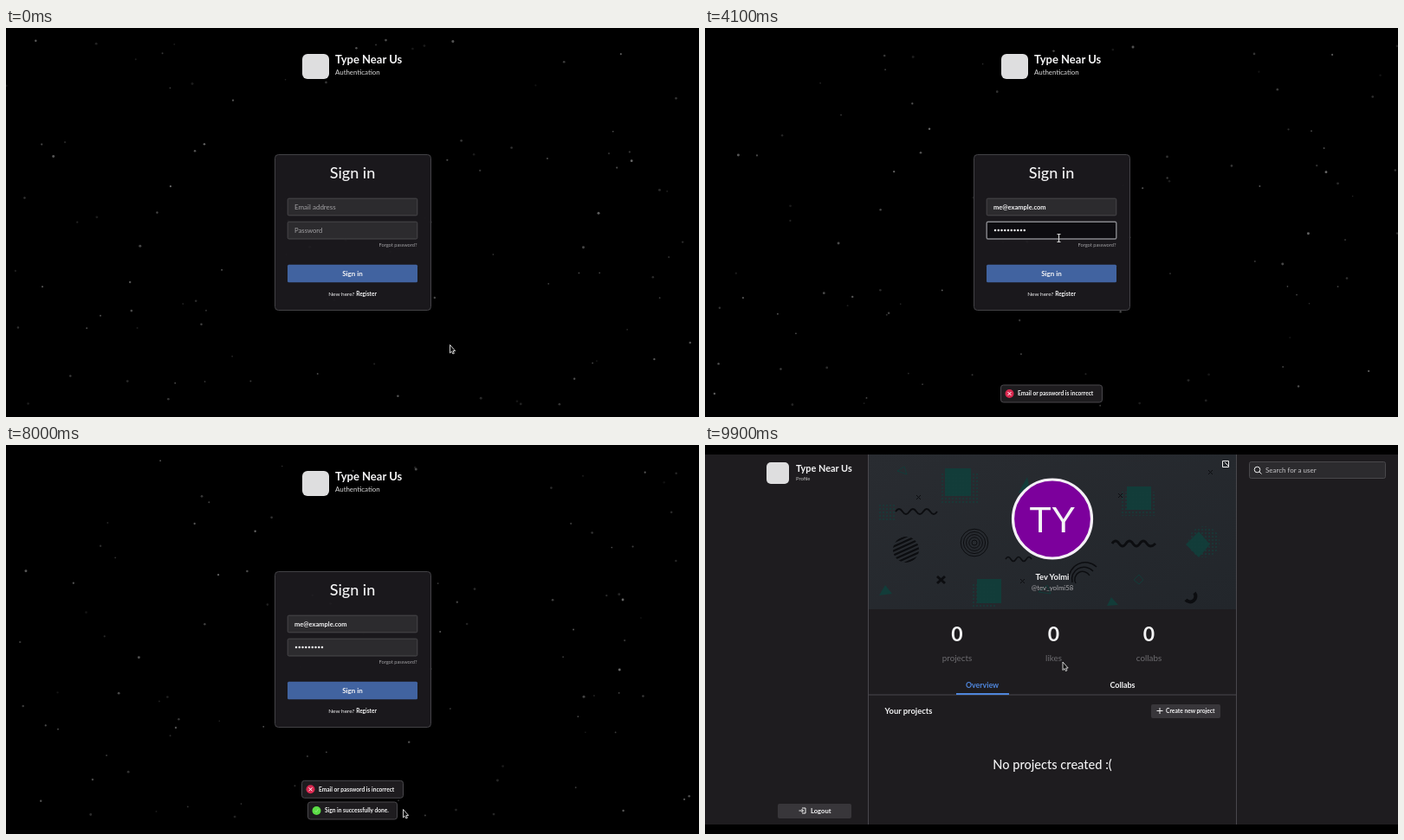
An HTML page for the animation above (10000 ms loop, 800x450 px).

```html
<!DOCTYPE html>
<html lang="en">
<head>
<meta charset="utf-8">
<title>Sign in</title>
<style>
  html, body { margin: 0; width: 100%; height: 100%; overflow: hidden; background: #000; }
  svg { display: block; width: 100vw; height: 100vh; }
  text { font-family: Lato, "Open Sans", sans-serif; fill: #f4f4f5; }
  .b { font-weight: 700; }
  .m { text-anchor: middle; }
  .dim { fill: #a2a1a4; }
  .field { fill: #2c2b2e; stroke: #49484b; }
  .focus { fill: #0d0c10; stroke: #87878c; stroke-width: 1.4; }
  .line { fill: none; stroke: #f0f0f0; }
  .rule { fill: none; stroke: #49474c; }
  .ink { fill: none; stroke: #0c0d10; }
  .teal { fill: none; stroke: #123c39; }
  .count { font: 700 23px Lato, sans-serif; }
  .label { font-size: 9.8px; fill: #6d6c70; }
</style>
</head>
<body>
<svg viewBox="0 0 800 450">
  <defs>
    <clipPath id="screen"><rect y="11" width="800" height="428"/></clipPath>
    <clipPath id="disc"><circle cx="232" cy="121" r="15"/></clipPath>
    <pattern id="dots" width="4" height="4" patternUnits="userSpaceOnUse">
      <circle cx="2" cy="2" r=".9" fill="#123c39"/>
    </pattern>
    <linearGradient id="shade" x2="1" y2="1">
      <stop stop-color="#292c31"/><stop offset="1" stop-color="#22262b"/>
    </linearGradient>
  </defs>

  <g id="login">
    <g id="stars"></g>
    <rect x="342" y="30" width="31" height="29" rx="6" fill="#dededf"/>
    <text class="b" x="380" y="41" font-size="13">Type Near Us</text>
    <text x="380" y="54" font-size="7.9" style="fill:#ddd">Authentication</text>

    <rect x="310.5" y="146.5" width="180" height="180" rx="4" fill="#1c1a1e" fill-opacity=".94" stroke="#434246"/>
    <text class="m" x="400" y="173.5" font-size="18" font-weight="500">Sign in</text>
    <rect id="emailBox" x="325.2" y="197.2" width="149.6" height="19.6" rx="1.5"/>
    <rect id="passBox" x="325.2" y="224.2" width="149.6" height="19.8" rx="1.5"/>
    <text id="emailHint" class="dim" x="333" y="209.5" font-size="8">Email address</text>
    <text id="passHint" class="dim" x="333" y="236.5" font-size="7.7">Password</text>
    <text id="email" class="b" x="333" y="209.5" font-size="7.5"></text>
    <line id="pass" x1="335" y1="234" y2="234" stroke="#f4f4f5" stroke-width="2.5" stroke-linecap="round" stroke-dasharray="0 3.75"/>
    <rect id="caret" width=".9" height="8" fill="#ddd"/>
    <text class="dim" x="474.5" y="253" font-size="5.7" text-anchor="end">Forgot password?</text>
    <rect id="button" x="325" y="273.7" width="150" height="20.5" rx="1.5"/>
    <text class="m b" x="400" y="286.7" font-size="8">Sign in</text>
    <text class="m" x="400" y="310" font-size="6.5">New here? <tspan class="b">Register</tspan></text>
  </g>

  <g id="profile">
    <rect y="11" width="800" height="428" fill="#1e1c1f"/>
    <rect x="71" y="20" width="26" height="25" rx="5" fill="#dededf"/>
    <text class="b" x="105" y="30.5" font-size="10.9">Type Near Us</text>
    <text x="105" y="40.5" font-size="5.8" style="fill:#bbb">Profile</text>

    <rect x="189" y="11" width="424" height="179" fill="url(#shade)"/>
    <g id="banner">
      <g fill="#123c39">
        <rect x="277" y="27" width="30" height="32"/>
        <rect x="314" y="155" width="28" height="28"/>
        <rect x="487" y="48" width="28" height="27"/>
        <path d="M555 115l15-15 13 15-13 15zM362 55l10-18 4 20zM201 174l7-12 8 10zM464 186l5-10 8 9z"/>
      </g>
      <g fill="url(#dots)">
        <rect x="272" y="32" width="44" height="36"/>
        <rect x="308" y="160" width="28" height="28"/>
        <rect x="480" y="54" width="40" height="28"/>
        <circle cx="576" cy="112" r="18"/>
        <rect x="200" y="68" width="20" height="20"/>
      </g>
      <g class="ink">
        <path d="M220 77q4-6 8 0t8 0 8 0 8 0 8 0 8 0" stroke-width="2"/>
        <path d="M470 114q4-6 8 0t8 0 8 0 8 0 8 0 10 0" stroke-width="3"/>
        <path d="M347 132q3-5 6 0t6 0 6 0 6 0 6 0" stroke-width="1.5"/>
        <path d="M268 152l9 8m0-8l-9 8" stroke-width="3"/>
        <path d="M244 58l5 5m0-5l-5 5M364 155l5 5m0-5l-5 5M581 29l5 5m0-5l-5 5M477 56l5 5m0-5l-5 5"/>
        <path d="M565 171a6 6 0 0 1-10 8" stroke-width="4"/>
        <path d="M424 159a14 14 0 0 1 24-13M428 160a9 9 0 0 1 16-9M420 156a19 19 0 0 1 32-15" stroke-width="1.5"/>
        <g id="stripes" clip-path="url(#disc)" stroke-width="2.2"></g>
        <g id="rings"></g>
      </g>
      <path class="teal" d="M385 170l10-8 4 10zM495 156l6-6 5 6-5 5zM222 30l8-5 3 9z"/>
    </g>
    <circle cx="401" cy="85.5" r="45.5" fill="#7c009c" stroke="#f4f0f6" stroke-width="3.2"/>
    <text class="m" x="401" y="101" style="font:42px 'Liberation Sans',Arial,sans-serif">TY</text>
    <text class="m b" x="401" y="156" font-size="9.4">Tev Yolmi</text>
    <text class="m" x="401" y="167.5" font-size="7.8" style="fill:#aaa9ac">@tev_yolmi58</text>
    <path class="line" d="M601 18.5h-3.5v7h7v-3.5M600 20l4 4M601 18.5h3.5v3.5"/>

    <text class="m count" x="291" y="227">0</text>
    <text class="m count" x="402.5" y="227">0</text>
    <text class="m count" x="512.5" y="227">0</text>
    <text class="m label" x="291" y="249.5">projects</text>
    <text class="m label" x="402.5" y="249.5">likes</text>
    <text class="m label" x="512.5" y="249.5">collabs</text>

    <path class="rule" d="M188.5 11V439M613.5 11V439M189 289H613"/>
    <text class="m b" x="320" y="281" font-size="8.8" style="fill:#4f86dc">Overview</text>
    <text class="m b" x="482" y="281" font-size="9">Collabs</text>
    <rect x="290" y="287" width="61" height="2" fill="#4f86dc"/>
    <text class="b" x="207.5" y="310.5" font-size="9.4">Your projects</text>
    <rect x="515" y="300" width="80" height="16" rx="2" fill="#38363a"/>
    <path class="line" d="M521.5 307.5h7m-3.5-3.5v7"/>
    <text class="b" x="532" y="310" font-size="6.7">Create new project</text>
    <text class="m" x="401" y="375" font-size="14.6" font-weight="500">No projects created :(</text>

    <rect x="84" y="415" width="85" height="17" rx="2" fill="#38363a"/>
    <path class="line" d="M112 420h4v6h-4M108.5 423h5m-2-2l2 2-2 2"/>
    <text class="b" x="122" y="426" font-size="7.6">Logout</text>
    <rect class="field" x="628.5" y="19.5" width="157" height="19" rx="2"/>
    <circle class="line" cx="637.5" cy="28.5" r="3.3"/>
    <path class="line" d="M640 31l2.5 2.5"/>
    <text x="647" y="32" font-size="8" style="fill:#c5c4c7">Search for a user</text>
  </g>

  <g id="toasts" clip-path="url(#screen)"></g>
  <path id="arrow" d="M0 0V9.5L2 7.6 3.4 10.5 4.9 9.8 3.6 7H6.2Z" fill="#111" stroke="#e4e4e4" stroke-width=".9"/>
  <path id="beam" d="M-2-4.5H2M0-4.5V4.5M-2 4.5H2" stroke="#d2d2d2" stroke-width="1.2"/>
</svg>
<script>
const LOOP = 10000, STEP = 100;
const $ = id => document.getElementById(id);
const smooth = p => (p = Math.min(1, Math.max(0, p)), p * p * (3 - 2 * p));
const ramp = (t, from, to) => smooth((t - from) / (to - from));
const within = (t, spans) => spans.some(([from, to]) => t >= from && t < to);

function make(parent, tag, attrs) {
  const el = document.createElementNS("http://www.w3.org/2000/svg", tag);
  for (const k in attrs) el.setAttribute(k, attrs[k]);
  return parent.appendChild(el);
}

// Each key is [time, ...values]; values ease from one key to the next.
function track(t, keys) {
  const i = keys.findIndex(k => k[0] > t);
  if (i < 0) return keys.at(-1).slice(1);
  const [t0, ...a] = keys[i - 1], [t1, ...b] = keys[i];
  return a.map((v, j) => v + (b[j] - v) * ramp(t, t0, t1));
}

const pointer = [
  [0, 512.5, 366.5], [600, 420, 208], [1150, 420, 208], [1450, 407, 236], [2500, 407, 236],
  [4000, 408.5, 243], [4150, 408.5, 243], [4450, 366, 208], [4700, 366, 208], [4900, 380, 235],
  [5150, 380, 235], [5350, 355, 285], [5500, 345, 286], [5700, 278, 285.5], [5900, 278, 285.5],
  [6200, 350, 208], [6400, 350, 208], [6600, 390, 284], [6700, 390, 284], [6850, 395, 235],
  [7250, 395, 235], [7450, 410, 284], [7600, 410, 284], [8000, 458.5, 421.5], [8400, 480, 420],
  [9000, 531, 408], [9250, 531, 408], [9900, 413, 251]
];
const emailKeys = [[0, 0], [650, 0], [1300, 14], [LOOP, 14]];
const passKeys = [
  [0, 0], [1550, 0], [2300, 10], [4900, 10], [5100, 9], [6900, 9], [6950, 0], [7000, 0], [7300, 9], [LOOP, 9]
];
const emailFocus = [[600, 1450], [4450, 4850], [6150, 6550]];
const passFocus = [[1450, 4450], [4850, 5350], [6850, 7450]];

const toasts = [
  ["Email or password is incorrect", 58.5, false, 3500, 5200],
  ["Email is not registered yet.", 49, false, 5610, 7000],
  ["Email or password is incorrect", 58.5, false, 6650, 8500],
  ["Sign in successfully done.", 51.5, true, 7550, 8500]
].map(([label, half, ok, start, end]) => {
  const el = make($("toasts"), "g", {});
  make(el, "rect", { x: -half, y: 0, width: 2 * half, height: 20, rx: 3, fill: "#1e1c1f", stroke: "#48474b" });
  make(el, "circle", { cx: 10 - half, cy: 10, r: 5, fill: ok ? "#5bdc45" : "#d8284f" });
  make(el, "path", {
    d: ok ? "M-2 0l1.5 1.7L2-2" : "M-2-2l4 4m0-4l-4 4", transform: `translate(${10 - half} 10)`,
    fill: "none", stroke: ok ? "#8aea7a" : "#fff"
  });
  make(el, "text", { class: "b", x: 19.5 - half, y: 12.4, "font-size": 6.6 }).textContent = label;
  return { el, start, end };
});

let seed = 77;
const rand = () => (seed = seed * 16807 % 2147483647) / 2147483647;
const stars = Array.from({ length: 105 }, () => {
  const star = {
    x: rand() * 800, y: rand() * 426, vx: (rand() - .5) * 16, vy: (rand() - .5) * 16,
    glow: .14 + rand() * .2, phase: rand() * 6.28
  };
  star.el = make($("stars"), "circle", { r: .8 + rand() * .7, fill: "#fff" });
  return star;
});

for (let y = 100; y < 160; y += 5) make($("stripes"), "path", { d: `M212 ${y}l40-18` });
for (let r = 3; r < 18; r += 3.2) make($("rings"), "circle", { cx: 311, cy: 113, r });

function drawForm(t) {
  const count = Math.round(track(t, emailKeys)[0]);
  const address = "me" + (within(t, [[4600, 6400]]) ? "2" : "") + "@example.com";
  const dots = Math.round(track(t, passKeys)[0]);
  const onEmail = within(t, emailFocus), onPass = within(t, passFocus);
  $("email").textContent = address.slice(0, count < 14 ? count : undefined);
  $("emailHint").style.opacity = count ? 0 : 1;
  $("passHint").style.opacity = dots ? 0 : 1;
  $("pass").style.opacity = dots ? 1 : 0;
  $("pass").setAttribute("x2", 335.1 + 3.75 * Math.max(0, dots - 1));
  $("emailBox").setAttribute("class", onEmail ? "focus" : "field");
  $("passBox").setAttribute("class", onPass ? "focus" : "field");
  $("caret").style.opacity = (onEmail || onPass) && t % 1100 < 550 ? 1 : 0;
  const typed = onPass ? dots * 3.75 : count ? $("email").getComputedTextLength() : 0;
  $("caret").setAttribute("x", 333 + typed);
  $("caret").setAttribute("y", onPass ? 230 : 203);

  const hover = [[5300, 5700], [6550, 6700], [7400, 7650]]
    .reduce((h, [from, to]) => Math.max(h, ramp(t, from - 100, from) - ramp(t, to, to + 200)), 0);
  const mix = (a, b) => Math.round(a + (b - a) * hover);
  $("button").setAttribute("fill", `rgb(${mix(65, 91)},${mix(99, 150)},${mix(160, 240)})`);
}

function drawToasts(t) {
  let lift = 0;
  for (const { el, start, end } of [...toasts].reverse()) {
    const enter = ramp(t, start, start + 300), leave = ramp(t, end, end + 300);
    el.setAttribute("transform", `translate(400 ${413 + 27 * (1 - enter) + 27 * leave - lift})`);
    el.style.opacity = enter > 0 ? 1 - leave : 0;
    lift += 24.7 * enter * (1 - leave);
  }
}

function draw(t) {
  const sec = t / 1000;
  for (const s of stars) {
    s.el.setAttribute("cx", (s.x + s.vx * sec + 800) % 800);
    s.el.setAttribute("cy", 12 + (s.y + s.vy * sec + 426) % 426);
    s.el.setAttribute("opacity", s.glow + .08 * Math.sin(s.phase + sec * 1.5));
  }
  drawForm(t);
  drawToasts(t);
  $("login").style.opacity = 1 - ramp(t, 8400, 8800);
  $("profile").style.opacity = ramp(t, 8850, 9450);

  const [x, y] = track(t, pointer);
  const overField = t < 8400 && x > 325 && x < 475 && (y > 197 && y < 217 || y > 224 && y < 245);
  for (const id of ["arrow", "beam"]) {
    $(id).setAttribute("transform", `translate(${x} ${y})`);
    $(id).style.opacity = (id === "beam") === overField ? 1 : 0;
  }
}

const begin = performance.now();
function tick() {
  const t = (performance.now() - begin) % LOOP;
  draw(Math.floor(t / STEP) * STEP);
  requestAnimationFrame(tick);
}
tick();
</script>
</body>
</html>
```
